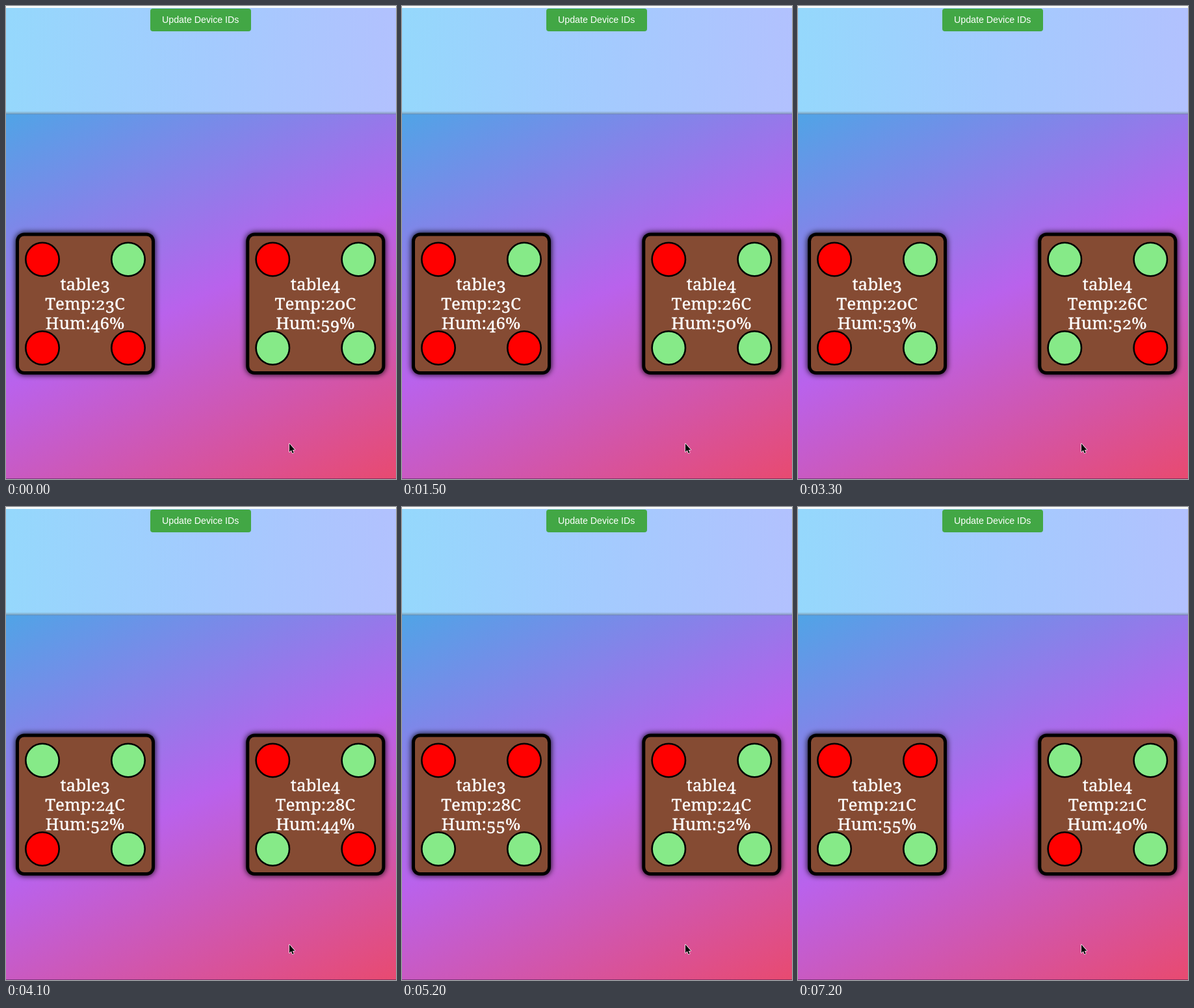
Write an HTML page with a canvas that moves like this. It is 600 px wide and 729 px high and loops after 7300 ms.

```html
<!DOCTYPE html>
<html>
<head>
<meta charset="utf-8">
<title>Table monitor</title>
<style>
  html, body { margin: 0; width: 100%; height: 100%; overflow: hidden; }
  canvas { display: block; }
</style>
</head>
<body>
<canvas id="stage" width="600" height="729"></canvas>
<script>
const ctx = document.getElementById('stage').getContext('2d');
const LOOP = 7300;
const FONT_SIZE = 26;

// Start time, then per table: seats (1 = taken), temperature, humidity.
const readings = [
  [0,    ['1011', 23, 46], ['1000', 20, 59]],
  [800,  ['1011', 23, 46], ['1000', 26, 50]],
  [2200, ['1010', 26, 41], ['0010', 29, 51]],
  [3300, ['1010', 20, 53], ['0001', 26, 52]],
  [4100, ['0010', 24, 52], ['1001', 28, 44]],
  [5200, ['1100', 28, 55], ['1000', 24, 52]],
  [6200, ['1100', 21, 55], ['0010', 21, 40]],
];

function gradient(x0, y0, x1, y1, ...colors) {
  const g = ctx.createLinearGradient(x0, y0, x1, y1);
  colors.forEach((c, i) => g.addColorStop(i / (colors.length - 1), c));
  return g;
}

function rect(x, y, w, h, fill) {
  ctx.fillStyle = fill;
  ctx.fillRect(x, y, w, h);
}

function roundRect(x, y, w, h, r, fill) {
  ctx.beginPath();
  ctx.roundRect(x, y, w, h, r);
  ctx.fillStyle = fill;
  ctx.fill();
}

// Shape old-style figures: small 0-2, lowered 3, 4, 5, 7 and 9.
function glyph(char) {
  const small = '012'.includes(char);
  const scaleX = char === '0' ? 1.12 : 1;
  const width = ctx.measureText(char).width;
  return {
    char, scaleX,
    scaleY: small ? 0.74 : 1,
    drop: '34579'.includes(char) ? 4.8 : 0,
    inset: char === '1' ? -1.4 : 0,
    advance: width * scaleX - (char === '1' ? 2.8 : 0),
  };
}

function label(text, cx, baseline) {
  ctx.font = `${FONT_SIZE}px "Noto Serif", serif`;
  ctx.textAlign = 'left';
  ctx.fillStyle = ctx.strokeStyle = '#fff';
  ctx.lineWidth = 0.35;
  const glyphs = [...text].map(glyph);
  let x = cx - glyphs.reduce((sum, g) => sum + g.advance, 0) / 2;
  for (const g of glyphs) {
    ctx.save();
    ctx.translate(x + g.inset, baseline + g.drop);
    ctx.scale(g.scaleX, g.scaleY);
    ctx.fillText(g.char, 0, 0);
    ctx.strokeText(g.char, 0, 0);
    ctx.restore();
    x += g.advance;
  }
}

function seat(x, y, taken) {
  ctx.beginPath();
  ctx.arc(x, y, 25.7, 0, Math.PI * 2);
  ctx.fillStyle = taken ? '#f00' : '#86ea88';
  ctx.fill();
  ctx.lineWidth = 2.6;
  ctx.strokeStyle = '#000';
  ctx.stroke();
}

function table(x, name, [seats, temp, hum]) {
  ctx.save();
  ctx.shadowColor = '#000';
  ctx.shadowBlur = 10;
  roundRect(x, 349.5, 214, 218.5, 13, '#000');
  ctx.restore();
  roundRect(x + 5, 354.5, 204, 208.5, 8, '#854b33');
  [...seats].forEach((s, i) =>
    seat(x + 41 + (i % 2) * 132, i < 2 ? 390.5 : 527, s === '1'));
  label(name, x + 106.6, 437.5);
  label(`Temp:${temp}C`, x + 106.6, 468);
  label(`Hum:${hum}%`, x + 106.6, 498.3);
}

function background() {
  rect(0, 0, 600, 729, '#f7fafa');
  rect(0, 166, 600, 563, gradient(138.6, 101.5, 461.4, 793.5, '#50a4e6', '#b962ec', '#e84a70'));
  rect(0, 728, 600, 1, 'rgba(70, 30, 80, .6)');
  rect(0, 3, 600, 163, gradient(0, 60, 600, 110, '#95d8fc', '#a3cbfe', '#b2c1fe'));
  rect(0, 162, 600, 4, gradient(0, 162, 0, 166, 'rgba(110, 130, 150, 0)', 'rgba(110, 130, 150, .6)'));
  rect(0, 166, 600, 2, gradient(0, 166, 0, 168, 'rgba(110, 130, 150, .5)', 'rgba(110, 130, 150, 0)'));
}

function button() {
  roundRect(222, 4, 155, 35, 4, '#42a745');
  ctx.font = '14.2px "Liberation Sans", Arial, sans-serif';
  ctx.textAlign = 'center';
  ctx.fillStyle = '#fff';
  ctx.fillText('Update Device IDs', 299.2, 26);
}

function pointer() {
  const arrow = new Path2D('M436 674.5V687.2L438.8 684.6L440.8 689.2L442.7 688.4L440.8 683.9H444.4Z');
  ctx.lineWidth = 1.4;
  ctx.lineJoin = 'round';
  ctx.strokeStyle = '#fff';
  ctx.stroke(arrow);
  ctx.fillStyle = '#000';
  ctx.fill(arrow);
}

function draw(now) {
  const time = now % LOOP;
  const [, left, right] = readings.findLast(r => r[0] <= time);
  background();
  button();
  table(15, 'table3', left);
  table(369.3, 'table4', right);
  pointer();
}

function tick() {
  draw(performance.now());
  requestAnimationFrame(tick);
}
tick();
</script>
</body>
</html>
```
